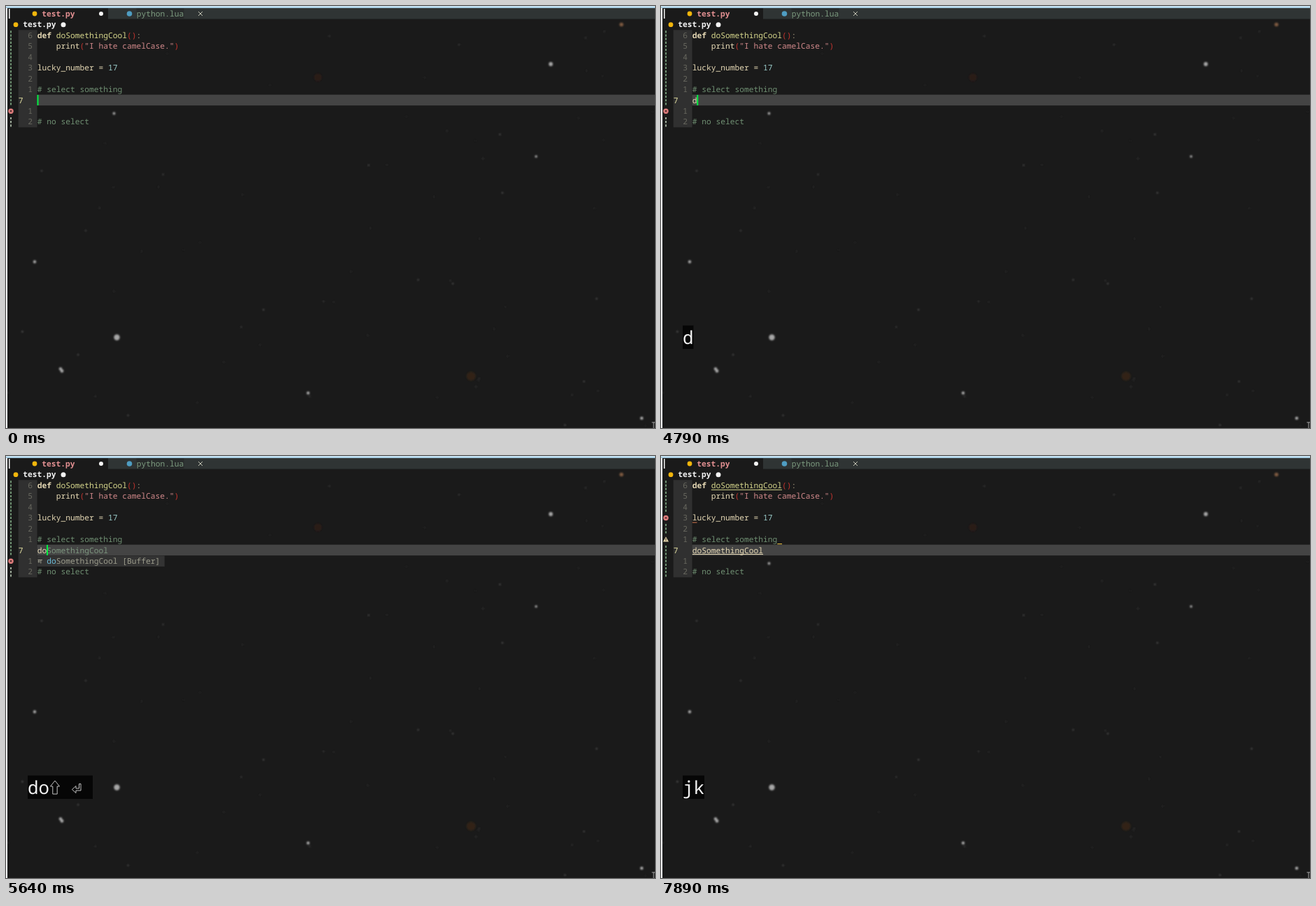
An HTML page that plays this animation: 928 px wide and 603 px high, repeating every 8 s.

```html
<!DOCTYPE html>
<html lang="en">
<head>
<meta charset="utf-8">
<title>Editor completion</title>
<style>
  html, body { margin: 0; width: 100%; height: 100%; overflow: hidden; background: #1a1a1a; }
  svg { display: block; width: 928px; height: 603px; }
  text {
    font: 11.25px "Noto Sans Mono", "DejaVu Sans Mono", monospace;
    white-space: pre; text-rendering: geometricPrecision;
  }
  .big { font-size: 25.8px; fill: #f2f2f2; }
</style>
</head>
<body>
<svg id="stage" viewBox="0 0 928 603"></svg>
<script>
const LOOP = 8000, BEAT = 140, CELL = 6.75, ROW = 15.45, LEFT = 44.8, TOP = 3.4, KEY = 15.5;
const WORD = 'doSomethingCool';
const C = {
  gutter: '#303030', line: '#444444', num: '#68685f', cream: '#e6d9b5', func: '#d6d68c',
  red: '#c0342e', str: '#d0888a', comment: '#6f8f72', cyan: '#9accca', sign: '#7aa27e',
  error: '#e58080', green: '#00f040', yellow: '#f2b60c', white: '#f4f4f4', key: '#c4c4c4'
};
const stage = document.getElementById('stage');
const rowY = r => TOP + r * ROW;
const colX = c => LEFT + c * CELL;

function el(tag, attrs, parent = stage) {
  const n = document.createElementNS('http://www.w3.org/2000/svg', tag);
  for (const k in attrs) n.setAttribute(k, attrs[k]);
  parent.appendChild(n);
  return n;
}
const group = () => el('g', {});
const rect = (x, y, width, height, fill, p) => el('rect', { x, y, width, height, fill }, p);
const dot = (cx, cy, r, fill, p) => el('circle', { cx, cy, r, fill }, p);
const stroke = (d, color, p, more) => el('path', { d, stroke: color, fill: 'none', ...more }, p);

// Each part is [string, colour, bold]
function text(x, row, parts, p) {
  const t = el('text', { x, y: rowY(row) + 11.5 }, p);
  for (const [s, fill, bold] of parts)
    el('tspan', { fill, 'font-weight': bold ? 700 : 400 }, t).textContent = s;
  return t;
}

function stars() {
  const soft = el('filter', { id: 'soft', x: '-5%', y: '-5%', width: '110%', height: '110%' });
  el('feGaussianBlur', { stdDeviation: 0.8 }, soft);
  const sky = el('g', { filter: 'url(#soft)' });
  let seed = 7;
  const random = () => (seed = seed * 16807 % 2147483647) / 2147483647;
  for (let i = 0; i < 70; i++) {
    const glow = 40 + 50 * random() ** 3;
    dot(928 * random(), 24 + 579 * random(), 1.2, `rgb(${glow},${glow},${glow})`, sky);
  }
  const brightest = [[158.5, 473.5, 4.2], [779, 83, 2.9], [78, 518.5, 2.3], [80, 521.5, 2.4],
    [41, 365.5, 2.2], [909, 589, 2.3], [432, 553, 2.2], [154.5, 153.5, 1.9], [758, 215, 1.8]];
  for (const [x, y, r] of brightest) dot(x, y, r, '#a6a6a6', sky);
  dot(446, 102, 5.5, '#291f19', sky);
  dot(665, 529, 6.5, '#302419', sky);
  dot(880, 26.5, 2.8, '#7c583f', sky);
}

function chrome() {
  rect(0, 0, 928, 3, '#a9cfe4');
  rect(0, 0, 928, 1, '#d6ebf6');
  rect(0, 3, 2, 600, '#eef2f4');
  rect(146, 3, 782, 15.5, '#2f3434');
  rect(186.5, 3, 68, 15.5, '#282b2b');
  rect(4, 4, 1.5, 14, C.white);
  dot(41, 11, 3.4, C.yellow);
  text(51.2, 0, [['test.py', '#e29092', 1]]);
  dot(136, 11, 3, C.white);
  dot(176.5, 11, 3.8, '#4f9dc2');
  text(186.8, 0, [['python.lua', '#7d9c80']]);
  stroke('M275 8l6 6m0-6l-6 6', '#c4c4b4');
  dot(14, 26.7, 3.4, C.yellow);
  text(24.2, 1, [['test.py', C.white, 1]]);
  dot(82, 26.7, 3.5, C.white);
  stroke('M923.5 595h4.5M926 595v8', '#a8a8a8');
}

function code() {
  rect(17.7, rowY(2), 26.8, ROW * 9, C.gutter);
  rect(44.5, 126.7, 884, ROW, C.line);
  for (let r = 2; r <= 10; r++)
    if (r !== 8) text(colX(-2), r, [[String(Math.abs(8 - r)), C.num]]);
  text(colX(-4), 8, [['7', '#e0dca0']]);
  text(LEFT, 2, [['def ', C.cream, 1], [WORD, C.func], ['()', C.red], [':', '#a89c80']]);
  text(LEFT, 3, [['    print', C.cream], ['(', C.red], ['"I hate camelCase."', C.str], [')', C.red]]);
  text(LEFT, 5, [['lucky_number = ', C.cream], ['17', C.cyan]]);
  text(LEFT, 7, [['# select something', C.comment]]);
  text(LEFT, 10, [['# no select', C.comment]]);
}

// Three dashes to a row
const dashes = (from, to, p, color = C.sign) => stroke(`M7 ${rowY(from) + 1}V${rowY(to)}`, color, p,
  { 'stroke-width': 1.8, 'stroke-dasharray': `3.2 ${ROW / 3 - 3.2}` });

function errorSign(row, p) {
  const y = rowY(row) + 7.8;
  dot(7, y, 3.7, C.error, p);
  stroke(`M5.6 ${y - 1.4}l2.8 2.8m0-2.8l-2.8 2.8`, '#2a1515', p);
}

function signs() {
  const before = group(), after = group();
  dashes(2, 9, before);
  errorSign(9, before);
  dashes(10, 11, before, '#a9b8a6');
  dashes(2, 5, after);
  errorSign(5, after);
  dashes(6, 7, after);
  el('path', { d: 'M7 115.2l4 7.3h-8z', fill: '#e6d6ac' }, after);
  rect(6.5, 117.5, 1, 3.6, '#3a3020', after);
  dashes(8, 11, after);
  rect(LEFT, 94.5, CELL, 1, '#d8794e', after);
  rect(colX(18), 125, CELL, 1.2, '#d9b23c', after);
  return { before, after };
}

function popup() {
  const g = group();
  rect(44.5, rowY(9), CELL * 27, ROW, '#333333', g);
  stroke('M45.5 148.5h6.5M49.8 148.5v5M45.5 151h3M47 148.5v4', '#a0a090', g);
  text(colX(2), 9, [['do', '#6cbcd8'], ['SomethingCool [Buffer]', '#9c9c8c']], g);
  return g;
}

stars();
chrome();
code();
const sign = signs();
const typed = text(LEFT, 8, [['', C.cream], ['', '#7d967f']]);
const cursor = rect(0, 127, 2, 15, C.green);
const menu = popup();
const refs = group();
rect(colX(4), 47.8, CELL * 15, 1, C.func, refs);
rect(LEFT, 140, CELL * 15, 1, C.cream, refs);
const keyBox = rect(31, 456.5, 0, 33.5, '#060606');
const keys = group();

const icons = {
  '⇧': 'M8 464l6.5 8h-3.3v11h-6.4v-11h-3.3z',
  '⏎': 'M11.5 468.5h2.5v9.5h-7v3.5l-5.5-5 5.5-5v3.5h4.5z'
};

function drawKeys(s) {
  keyBox.setAttribute('width', s.length * KEY);
  keys.textContent = '';
  [...s].forEach((k, i) => {
    const x = 31 + i * KEY;
    if (icons[k]) stroke(icons[k], C.key, keys, { transform: `translate(${x})` });
    else el('text', { x, y: 483, class: 'big' }, keys).textContent = k;
  });
}

// Changes to the state, in order of time
const beats = (start, ...changes) => changes.map((c, i) => ({ at: start + i * BEAT, ...c }));
const blink = (...times) => times.map((at, i) => ({ at, cursor: i % 2 ? 'bar' : '' }));
const steps = [
  { at: 0, typed: '', ghost: '', keys: '', cursor: 'bar', menu: 0, diag: 0, refs: 0 },
  ...blink(420, 990, 2110, 2680, 3240, 3660, 4230, 4510),
  ...beats(4650, { typed: 'd' }, { keys: 'd' }, { typed: 'do', keys: 'do' },
    { ghost: WORD.slice(2), menu: 1 }, { keys: 'do⇧ ' }),
  ...beats(5640, { keys: 'do⇧ ⏎ ' }, { typed: WORD, ghost: '', menu: 0 }),
  ...blink(6200, 6760),
  ...beats(6900, { keys: 'j' }, { typed: WORD + 'j' }, { keys: 'jk' },
    { typed: WORD, cursor: 'block' }, { diag: 1 }, { refs: 1 }),
  { at: 7890, cursor: '' }
];

const show = (n, on) => n.setAttribute('visibility', on ? 'visible' : 'hidden');

function draw(s) {
  const block = s.cursor === 'block';
  typed.children[0].textContent = s.typed;
  typed.children[1].textContent = s.ghost;
  cursor.setAttribute('x', colX(s.typed.length - block) - 0.3);
  cursor.setAttribute('width', block ? CELL : 2);
  cursor.setAttribute('fill-opacity', block ? 0.7 : 1);
  show(cursor, s.cursor);
  show(menu, s.menu);
  show(sign.before, !s.diag);
  show(sign.after, s.diag);
  show(refs, s.refs);
  drawKeys(s.keys);
}

let last = 0;
function tick() {
  const t = performance.now() % LOOP;
  const past = steps.filter(s => s.at <= t);
  if (past.length !== last) {
    last = past.length;
    draw(Object.assign({}, ...past));
  }
  requestAnimationFrame(tick);
}
tick();
</script>
</body>
</html>
```
